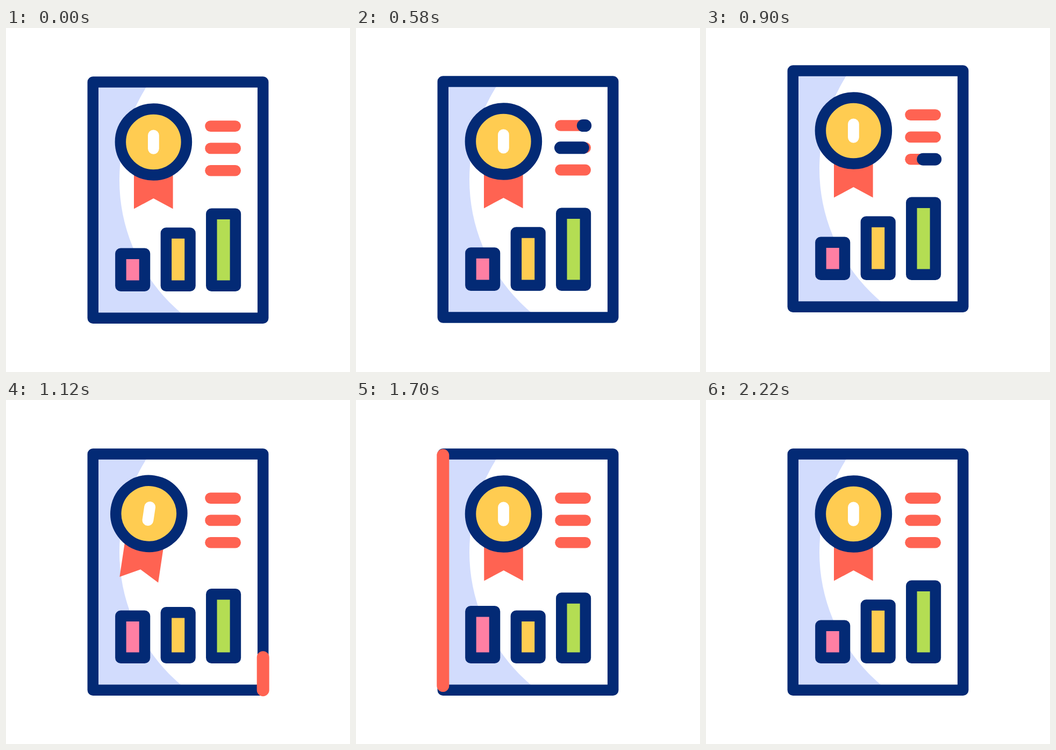
An HTML page that plays this animation: 640x640 px, repeating every 2400 ms.

```html
<!DOCTYPE html>
<html lang="en">
<head>
<meta charset="utf-8">
<title>Certificate report</title>
<style>
  html, body { margin: 0; width: 100%; height: 100%; overflow: hidden; background: #fff; }
  svg { display: block; width: 100vw; height: 100vh; }
  .ink { stroke: #032a75; stroke-width: 20.5; stroke-linejoin: round; }
  .line { stroke: #ff6352; stroke-width: 20.6; stroke-linecap: round; }
  .runner { stroke-width: 23; stroke-linecap: round; stroke-linejoin: round; fill: none; }
</style>
</head>
<body>
<svg viewBox="0 0 640 640">
  <defs>
    <clipPath id="page"><rect x="161.8" y="100.5" width="316.4" height="439.2"/></clipPath>
  </defs>
  <g id="sheet">
    <g clip-path="url(#page)">
      <rect x="161" y="100" width="318" height="441" fill="#d2dcfd"/>
      <circle cx="535" cy="283" r="324" fill="#fff"/>
    </g>
    <rect class="ink" x="161.8" y="100.5" width="316.4" height="439.2" fill="none"/>
    <g id="bars"></g>
    <g id="lines"></g>
    <g id="medal">
      <path d="M238 230H310.6V336.5L274.4 317L238 336.5Z" fill="#ff6352"/>
      <circle class="ink" cx="274.4" cy="212" r="61.5" fill="#ffcc51"/>
      <path d="M274.4 199.8V224.3" stroke="#fff" stroke-width="20.8" stroke-linecap="round"/>
    </g>
    <path id="outline" class="runner" stroke="#ff6352" pathLength="1"
      d="M478.2 539.7V100.5H161.8V539.7Z"/>
  </g>
</svg>
<script>
const LOOP = 2400;
const BAR_BOTTOM = 479.8;
const LINE_LEFT = 380.5;
const LINE_RIGHT = 426.7;

const byId = id => document.getElementById(id);
const sheet = byId('sheet');
const medal = byId('medal');
const outline = byId('outline');

function add(parent, tag, attrs) {
  const node = document.createElementNS('http://www.w3.org/2000/svg', tag);
  set(node, attrs);
  parent.appendChild(node);
  return node;
}

function set(node, attrs) {
  for (const name in attrs) node.setAttribute(name, attrs[name]);
}

const linear = (t, from, to) => Math.min(1, Math.max(0, (t - from) / (to - from)));
const ease = (t, from, to) => {
  const s = linear(t, from, to);
  return s * s * (3 - 2 * s);
};

// Eased value through a list of evenly spaced keys.
function keys(t, start, step, values) {
  let value = values[0];
  for (let i = 1; i < values.length; i++) {
    const from = start + (i - 1) * step;
    value += (values[i] - values[i - 1]) * ease(t, from, from + step);
  }
  return value;
}

const bars = [
  { x: 213.4, top: 419.7, shift: -53.2, fill: '#ff7fa3' },
  { x: 297.9, top: 381.6, shift: 40.7, fill: '#ffcc51' },
  { x: 382.3, top: 345.8, shift: 45.7, fill: '#b4dd53' }
].map(bar => ({
  ...bar,
  node: add(byId('bars'), 'rect', { class: 'ink', x: bar.x, width: 44.6, fill: bar.fill })
}));

const runners = [182.6, 223.9, 265.2].map(y => {
  const place = { x1: LINE_LEFT, x2: LINE_RIGHT, y1: y, y2: y };
  add(byId('lines'), 'line', { class: 'line', ...place });
  return add(byId('lines'), 'line', { class: 'runner', stroke: '#032a75', ...place });
});

const visible = on => on ? 'visible' : 'hidden';

function render(t) {
  const lift = keys(t, 200, 200, [0, -42.6, 0, -42.6, 0]);
  set(sheet, { transform: `translate(0 ${lift})` });

  runners.forEach((node, i) => {
    const start = 200 + i * 200;
    const head = linear(t, start, start + 200);
    const tail = linear(t, start + 200, start + 400);
    const at = f => LINE_LEFT + (LINE_RIGHT - LINE_LEFT) * f;
    set(node, { x1: at(tail), x2: at(head), visibility: visible(head > tail) });
  });

  const swing = keys(t, 1000, 200, [0, 13, -13, 6.4, -6.4, 0]);
  set(medal, { transform: `rotate(${swing} 274.4 154)` });

  const mix = ease(t, 1000, 1310) - ease(t, 1550, 1850);
  for (const { node, top, shift } of bars) {
    const y = top + shift * mix;
    set(node, { y, height: BAR_BOTTOM - y });
  }

  const head = ease(t, 1000, 2000);
  const tail = ease(t, 1200, 2200);
  set(outline, {
    'stroke-dasharray': `${head - tail} 2`,
    'stroke-dashoffset': -tail,
    visibility: visible(head - tail > 1e-5)
  });
}

const begin = performance.now();
function tick() {
  render((performance.now() - begin) % LOOP);
  requestAnimationFrame(tick);
}
render(0);
requestAnimationFrame(tick);
</script>
</body>
</html>
```
